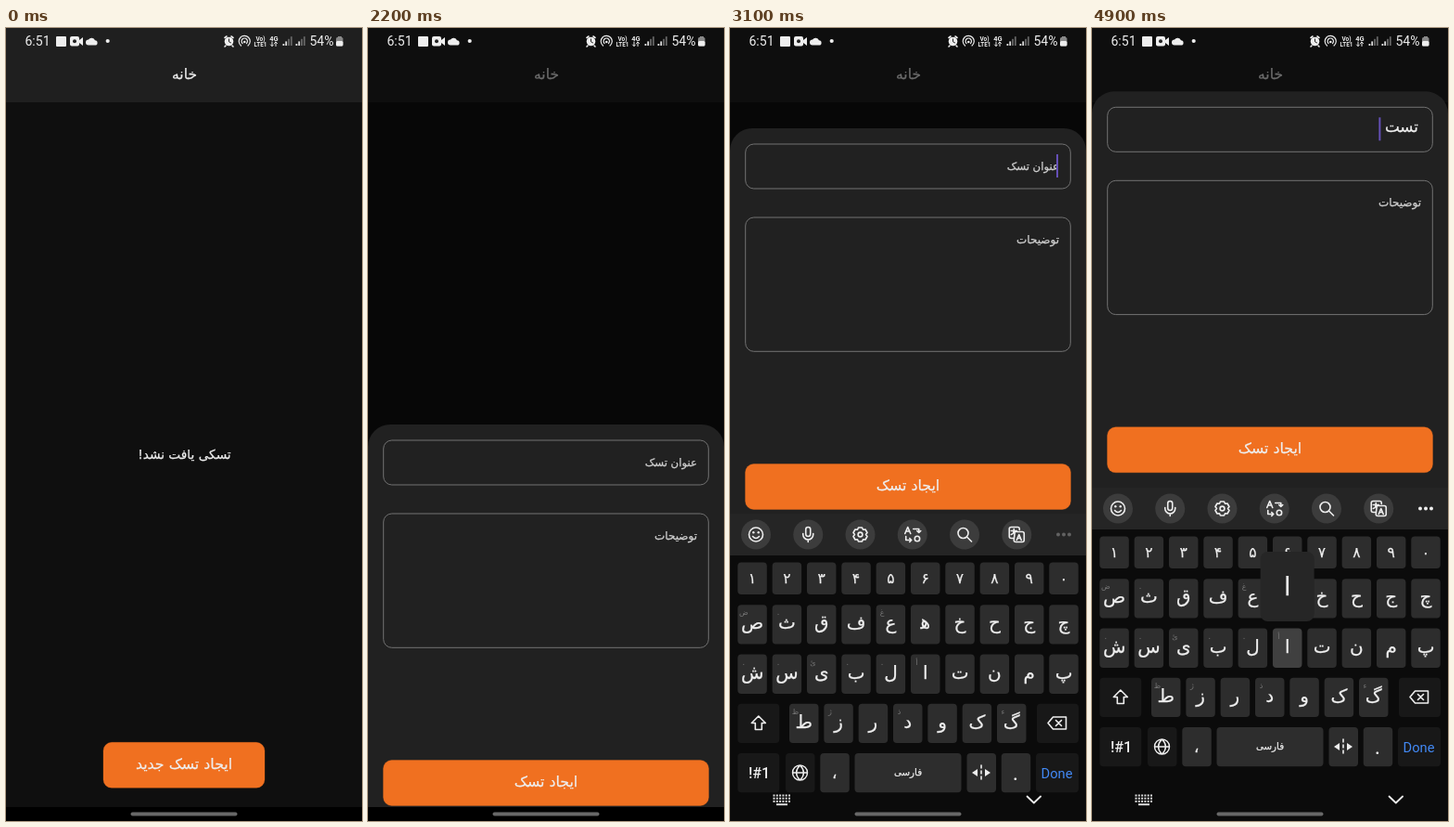
Recreate the animation shown at these times as an HTML page. Size 384 by 854 pixels, loop 5300 ms.

```html
<!DOCTYPE html>
<html lang="fa">
<head>
<meta charset="utf-8">
<style>
html, body { margin: 0; width: 100%; height: 100%; overflow: hidden; background: #000; }
svg { display: block; width: 384px; height: 854px; }
text { font-family: Roboto, sans-serif; fill: #eee; }
.fa { font-family: "DejaVu Sans", sans-serif; direction: rtl; stroke: #eee; stroke-width: .25; }
.mid { text-anchor: middle; }
.soft { fill: #d0d0d0; stroke: #d0d0d0; }
.faint { fill: #777; stroke: none; }
.line { fill: none; stroke: #eee; stroke-width: 1.6; stroke-linecap: round; stroke-linejoin: round; }
</style>
</head>
<body>
<svg id="stage" viewBox="0 0 384 854"></svg>
<script>
const LOOP = 5300;

const rect = (x, y, w, h, fill, r = 0, more = '') =>
  `<rect x="${x}" y="${y}" width="${w}" height="${h}" rx="${r}" fill="${fill}" ${more}/>`;
const text = (x, y, s, size, cls = '', more = '') =>
  `<text x="${x}" y="${y}" font-size="${size}" class="${cls}" ${more}>${s}</text>`;
const fa = (x, y, s, size, cls = '', more = '') => text(x, y, s, size, 'fa mid ' + cls, more);
const dot = (x, y, r, fill = '#eee') => `<circle cx="${x}" cy="${y}" r="${r}" fill="${fill}"/>`;
const line = (d, more = '') => `<path class="line" d="${d}" ${more}/>`;
const at = (x, y, s) => `<g transform="translate(${x} ${y})">${s}</g>`;
const button = (x, y, w, label) =>
  rect(x, y, w, 49, '#f07020', 9, 'stroke="#f07020" stroke-opacity=".3"') +
  fa(x + w / 2, y + 28.7, label, 15.8);

function statusBar() {
  const bars = x => [0, 1, 2, 3].map(i =>
    rect(x + i * 2.8, 17 - i * 2.6, 1.8, 2 + i * 2.6, i < 2 ? '#ddd' : '#666')).join('');
  return text(20.5, 19, '6:51', 14) +
    rect(54, 9, 11, 11, '#eee', 1) +
    rect(69, 9, 10, 10.5, '#eee', 2) + '<path d="M79 13l4-3v9l-4-3z" fill="#eee"/>' + dot(74, 14.2, 2, '#222') +
    '<path d="M89 18.5a3 3 0 0 1 0-6a4 4 0 0 1 7 .8a2.6 2.6 0 0 1 0 5.2z" fill="#eee"/>' +
    dot(109.7, 14, 2.1) +
    dot(240.5, 14.5, 4.8) + line('M236 10.5l2-1.5M245 10.5l-2-1.5M237 19l-1 1M244 19l1 1') +
    '<path d="M240.5 11.5v3.3l2.3 1.2" stroke="#222" fill="none"/>' +
    line('M253.5 19a6 6 0 1 1 7.5 0M255 16.5a3.2 3.2 0 1 1 4.5 0', 'style="stroke-width:1.2"') + dot(257.3, 15, 1.3) +
    text(274.5, 13.5, 'Vo)', 6.5, 'mid', 'font-weight="700"') +
    text(274.5, 20, 'LTE1', 6.3, 'mid', 'font-weight="700"') +
    text(289, 13.5, '4G', 7.5, 'mid', 'font-weight="700"') +
    line('M287 15v4.5l-1.5-1.5M287 19.5l1.5-1.5M291 19.5V15l-1.5 1.5M291 15l1.5 1.5', 'style="stroke-width:1"') +
    bars(298.5) + bars(312.5) +
    text(327.5, 19, '54%', 14) +
    rect(358, 9, 4, 2, '#888') + rect(356, 10, 7.5, 9.5, '#888', 1.5) + rect(356, 14, 7.5, 5.5, '#eee', 1.5);
}

// Coordinates are relative to the sheet's top edge
function sheet() {
  const box = (y, h) => rect(16.7, y, 350.6, h, 'none', 9, 'stroke="#727272" stroke-width="1"');
  return rect(0, 0, 384, 900, '#212121', 24) +
    box(17, 48) + box(96, 144.3) +
    text(355, 44.5, 'عنوان تسک', 11.7, 'fa soft', 'id="hint"') +
    text(352, 43.7, '', 16.8, 'fa', 'id="typed"') +
    rect(0, 28, 2, 25, '#6550b8', 0, 'id="caret"') +
    text(355, 124, 'توضیحات', 12, 'fa soft') +
    button(16.5, 361.5, 351, 'ایجاد تسک');
}

const PITCH = 37.33;
const SMALL = { 'ص': 'ض', 'ث': '.', 'ع': 'غ', 'ش': '.', 'س': '.', 'ی': 'ئ', 'ب': '.', 'ل': '.', 'ا': 'أ', 'ط': 'ظ', 'ز': 'ژ', 'د': 'ذ', 'گ': 'ء' };
const ROW2 = 'شسیبلاتنمپ';
const ICONS = [
  line('M-7.5 0a7.5 7.5 0 1 0 15 0a7.5 7.5 0 1 0-15 0M-3.5 2q3.5 4 7 0') + dot(-2.7, -2.2, 1.2) + dot(2.7, -2.2, 1.2),
  line('M-2.5-5.5a2.5 2.5 0 0 1 5 0v5a2.5 2.5 0 0 1-5 0zM-5.5-1v1a5.5 5.5 0 0 0 11 0v-1M0 5.5v2.5'),
  line('M-2-7.5h4l1 2.3l2.5-.3l2 3.5l-1.5 2l1.5 2l-2 3.5l-2.5-.3l-1 2.3h-4l-1-2.3l-2.5.3l-2-3.5l1.5-2l-1.5-2l2-3.5l2.5.3z') + line('M-2.4 0a2.4 2.4 0 1 0 4.8 0a2.4 2.4 0 1 0-4.8 0'),
  line('M-8-1l3-7l3 7M-7-3.5h4M1-6h6v4M5-4l2 2l2-2M-7 2v4h6M-3 4l2 2l-2 2M2.5 4.5a2.7 2.7 0 1 0 5.4 0a2.7 2.7 0 1 0-5.4 0'),
  line('M-7-1.5a5.5 5.5 0 1 0 11 0a5.5 5.5 0 1 0-11 0M3 3l4.5 4.5'),
  line('M-3 4h-3q-2 0-2-2v-8q0-2 2-2h7q2 0 2 2v1M-6-4h6M-3-6v2q0 3-3 4M-2-3h8q2 0 2 2v7q0 2-2 2h-7q-2 0-2-2zM0 6l2.5-6l2.5 6M1 4h3')
];

// Coordinates are relative to the keyboard's top edge
function keyboard() {
  const key = (x, y, w, h = 42.3, fill = '#2d2d2d', id = '') => rect(x, y, w, h, fill, 4, id);
  const letters = (row, x0, y) => [...row].map((c, i) => {
    const x = x0 + i * PITCH;
    return key(x, y, 31.5, 42.3, '#2d2d2d', `id="key-${c}"`) +
      fa(x + 15.8, y + 26, c == 'ه' ? 'ه\u200d' : c, 20) +
      (SMALL[c] ? fa(x + 6.5, y + 11, SMALL[c], 8, 'faint') : '');
  }).join('');
  const dark = (x, y, w) => key(x, y, w, 42.3, '#181818');

  const digits = [...'۱۲۳۴۵۶۷۸۹۰'].map((c, i) =>
    key(8.3 + i * PITCH, 51.5, 31.5, 34.5) + fa(24 + i * PITCH, 73.7, c, 15.5)).join('');
  const tools = ICONS.map((icon, i) => at(28 + i * 56.25, 21.5, dot(0, 0, 16, '#3c3c3c') + icon)).join('');

  return rect(0, 0, 384, 400, '#0b0b0b') + rect(0, -1, 384, 45, '#252525') + tools +
    `<g id="more">${[354, 360, 366].map(x => dot(x, 21.5, 2)).join('')}</g>` +
    digits + letters('صثقفعهخحجچ', 8.3, 97.3) + letters(ROW2, 8.3, 150.6) + letters('طزردوکگ', 64, 203.8) +
    dark(8.3, 203.8, 45) + at(30.8, 225, line('M0-8l7.5 7.5h-4v7h-7v-7h-4z')) +
    dark(331, 203.8, 45) + at(353, 224.5, line('M-10 0l5.5-6.5h14v13h-14zM-1.5-3l6 6M4.5-3l-6 6')) +
    dark(8.3, 257, 45) + text(31.5, 283.5, '!#1', 16, 'mid', 'font-weight="500"') +
    dark(60, 257, 31.5) + at(75.5, 278, line('M-8 0a8 8 0 1 0 16 0a8 8 0 1 0-16 0M-8 0h16M0-8q-8 8 0 16M0-8q8 8 0 16', 'style="stroke-width:1.4"')) +
    key(97.3, 257, 31.5) + fa(112.7, 284, '،', 17) +
    key(134.5, 257, 115) + fa(192, 281, 'فارسی', 10.3) +
    key(255.5, 257, 31.5) + at(271, 278, line('M0-8v16', 'stroke-dasharray="3 3"') + '<path d="M-4-4v8l-6-4zM4-4v8l6-4z" fill="#eee"/>') +
    key(292.7, 257, 31.5) + text(308, 285.5, '.', 24, 'mid') +
    dark(330, 257, 46) + text(352.5, 283.5, 'Done', 14.7, 'mid', 'style="fill:#4289f5"') +
    `<g id="popup">${rect(-29, 68, 58, 75, '#262626', 8)}${fa(0, 114.5, '', 27, '', 'id="big"')}</g>`;
}

function navIcons() {
  let dots = '';
  for (let r = 0; r < 3; r++)
    for (let c = 0; c < 6; c++) dots += rect(46.5 + c * 3.3, 825.5 + r * 3.2, 2, 2, '#ddd');
  return dots + rect(50, 835.2, 12, 2, '#ddd') + line('M320.5 827.5l7.3 7l7.3-7', 'style="stroke-width:1.8"');
}

const $ = id => document.getElementById(id);
$('stage').innerHTML =
  rect(0, 0, 384, 854, '#0f0f0f') + rect(0, 0, 384, 80, '#1f1f1f') +
  fa(192.5, 55, 'خانه', 15.5) +
  fa(192.5, 464, 'تسکی یافت نشد!', 13.7) +
  button(105, 769.3, 174, 'ایجاد تسک جدید') +
  rect(0, 0, 384, 854, '#000', 0, 'id="scrim" opacity=".55"') +
  `<g id="sheet">${sheet()}</g>` + rect(0, 839, 384, 15, '#000') +
  `<g id="keyboard">${keyboard()}</g><g id="nav">${navIcons()}</g>` +
  rect(134.5, 844.5, 115, 4, '#686868', 2) + statusBar();

// Each track is a list of [start ms, value]; a value holds until the next
const TRACKS = {
  sheet: [[0, 900], [1200, 436], [1400, 427], [2900, 412], [3000, 272.5], [3100, 108], [3200, 80], [3300, 71], [3400, 68.3]],
  keyboard: [[0, 900], [2900, 800], [3000, 651], [3100, 524], [3200, 503], [3300, 497.5], [3400, 496]],
  caret: [[0, 0], [1600, 1], [2200, 0], [2900, 1], [3500, 0], [3800, 1]],
  typed: [[0, ''], [4300, 'ت'], [4400, 'تس'], [4600, 'تست']],
  pressed: [[0, ''], [4000, 'ت'], [4300, 'س'], [4400, ''], [4500, 'ت'], [4600, ''], [4800, 'ا']]
};
const value = (name, t) => TRACKS[name].findLast(step => step[0] <= t)[1];
const show = (id, on) => $(id).setAttribute('visibility', on ? 'visible' : 'hidden');
const moveTo = (id, x, y) => $(id).setAttribute('transform', `translate(${x} ${y})`);

function draw(t) {
  moveTo('sheet', 0, value('sheet', t));
  moveTo('keyboard', 0, value('keyboard', t));
  show('scrim', t >= 1200);
  show('nav', t >= 2500);
  $('more').setAttribute('opacity', t < 3400 ? .3 : 1);

  const typed = value('typed', t);
  $('typed').textContent = typed;
  show('hint', !typed);
  show('caret', value('caret', t));
  $('caret').setAttribute('x', typed ? 345.5 - $('typed').getComputedTextLength() : 352);

  const pressed = value('pressed', t);
  for (const c of ROW2) $('key-' + c).setAttribute('fill', c == pressed ? '#404040' : '#2d2d2d');
  show('popup', pressed);
  $('big').textContent = pressed;
  moveTo('popup', 24 + ROW2.indexOf(pressed) * PITCH, 0);
}

const start = performance.now();
function tick() {
  draw((performance.now() - start) % LOOP);
  requestAnimationFrame(tick);
}
tick();
</script>
</body>
</html>
```
